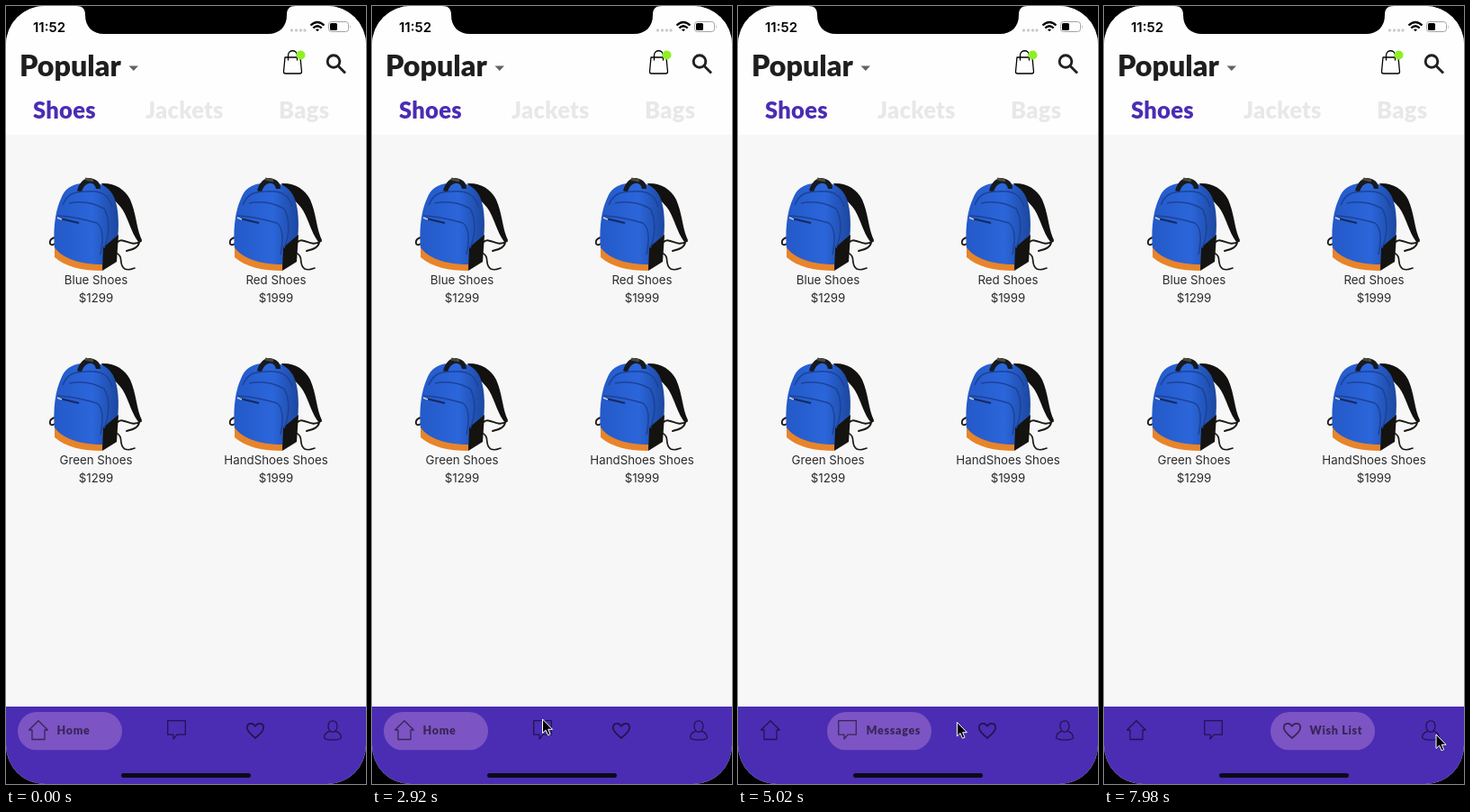
An HTML page that plays this animation: 400 by 864 pixels, repeating every 8000 ms.

```html
<!DOCTYPE html>
<html lang="en">
<head>
<meta charset="utf-8">
<title>Shop tab bar</title>
<style>
html, body { margin: 0; width: 100%; height: 100%; overflow: hidden; background: #000; }
svg { display: block; }
#stage { width: 100%; height: 100%; }
.head { font-family: Lato, sans-serif; font-weight: 900; }
.tab { font-size: 25.5px; letter-spacing: .3px; fill: #e8e8e8; }
.item { font: 13.3px Inter, sans-serif; text-anchor: middle; fill: #2b2b2b; }
.nav { font: 900 12.5px Lato, sans-serif; letter-spacing: .7px; }
.line { fill: none; stroke: #000; stroke-width: 1.3; stroke-linejoin: round; stroke-linecap: round; }
</style>
</head>
<body>
<svg id="stage" viewBox="0 0 400 864">
  <defs>
    <clipPath id="screen"><rect width="400" height="864" rx="43"/></clipPath>
    <linearGradient id="cloth">
      <stop offset="0" stop-color="#2459c8"/>
      <stop offset=".6" stop-color="#2b66da"/>
      <stop offset="1" stop-color="#1c479f"/>
    </linearGradient>
    <g id="pack">
      <path d="M58 7C72 6 84 13 90 25C97 41 97 58 103 70L100 73C92 64 89 49 82 37C77 29 70 23 64 20Z" fill="#121110"/>
      <g fill="none" stroke="#1b1914" stroke-linecap="round">
        <path d="M8 67C3 67 0 70 1 74C4 78 6 72 9 74" stroke-width="1.8"/>
        <path d="M76 72C84 66 90 79 102 71M100 71C100 78 94 80 86 82" stroke-width="2"/>
        <path d="M74 84C84 88 76 97 84 102C89 104 92 102 95 101" stroke-width="1.7"/>
      </g>
      <path d="M6 80C4 57 7 37 13 24C17 13 25 8 36 7C52 4 64 8 71 20C77 32 78 50 76 70L60 102L20 94Z" fill="url(#cloth)"/>
      <path d="M6 78C14 90 34 97 59 97L59 104C38 104 18 100 6 89Z" fill="#e8842a"/>
      <path d="M60 78L77 64L75 94L59 104Z" fill="#15130f"/>
      <path d="M31 15C34 5 39 1 45 1C52 2 57 5 57 13L52 13C51 8 48 6 44 7C40 8 37 12 36 17Z" fill="#171a20"/>
      <path d="M40 2L49 4" stroke="#4a4a3c" stroke-width="3"/>
      <g fill="none" stroke="#1b4299" stroke-width="1.5">
        <path d="M15 31C20 19 27 16 41 16C58 15 66 19 70 33"/>
        <path d="M22 29C37 26 50 29 61 35C68 47 67 65 61 79"/>
        <path d="M9 43C24 43 38 47 53 51C60 56 60 71 57 86"/>
      </g>
      <path d="M12 46L33 51" stroke="#15295c" stroke-width="2"/>
      <path d="M9 45L14 47" stroke="#c9d4e6" stroke-width="1.5"/>
    </g>
    <path id="home" d="M11 .7L.7 11H4V21.5H18V11H21.3Z"/>
    <path id="chat" d="M.7 .7H20.3V16.2H11L7 21V16.2H.7Z"/>
    <path id="heart" d="M12 20C7 16 2.8 12.5 2.8 8.6C2.8 3 9.3 2.2 12 6.8C14.7 2.2 21.2 3 21.2 8.6C21.2 12.5 17 16 12 20Z" stroke-width="1.8"/>
    <path id="user" d="M12 .8C8.6 .8 7 3.500 7 6.700C7 10.300 9 13.300 12 13.300C15 13.300 17 10.300 17 6.700C17 3.500 15.400 .8 12 .8ZM8.500 12.300C4.500 13.800 2.600 16 2.600 19.300C2.600 23 21.400 23 21.400 19.300C21.400 16 19.500 13.800 15.500 12.300"/>
  </defs>
  <rect width="400" height="864"/>
  <g clip-path="url(#screen)">
    <rect width="400" height="864" fill="#f7f7f7"/>
    <rect width="400" height="143" fill="#fefefe"/>
    <path d="M78 0C85 0 88 3 88 10C88 23 96 31 109 31H291C304 31 312 23 312 10C312 3 315 0 322 0Z"/>

    <text x="30" y="28.5" font-family="Inter, sans-serif" font-size="15" font-weight="600">11:52</text>
    <g fill="#cbcbcb">
      <circle cx="317.5" cy="27" r="1.7"/><circle cx="322.5" cy="27" r="1.7"/>
      <circle cx="327.5" cy="27" r="1.7"/><circle cx="332" cy="27" r="1.7"/>
    </g>
    <g fill="none" stroke="#000" stroke-width="2.3">
      <path d="M338.500 21.500Q346 14.500 353.500 21.500M341.300 24.500Q346 20 350.700 24.500"/>
      <path d="M344 26.300L346 28.300L348 26.300Q346 24.800 344 26.300Z" fill="#000" stroke="none"/>
    </g>
    <rect x="358.5" y="17.5" width="22" height="11" rx="3" fill="none" stroke="#a3a3a3"/>
    <path d="M382 21V25.500Q383.700 23.200 382 21Z" fill="#a3a3a3"/>
    <rect x="360" y="19" width="8" height="8" rx="1.5"/>

    <g class="head">
      <text x="15" y="78" font-size="32.2" fill="#1e1e1e">Popular</text>
      <text class="tab" x="30" y="125" style="fill:#4a2db3">Shoes</text>
      <text class="tab" x="155" y="125">Jackets</text>
      <text class="tab" x="303" y="125">Bags</text>
    </g>
    <path d="M136.500 66.500H147L141.800 72Z" fill="#636363"/>
    <path class="line" d="M310 57H327L328.500 73Q328.500 75 326.500 75H310.500Q308.500 75 308.500 73ZM313.500 60V55C313.500 48 323.500 48 323.500 55V60"/>
    <circle cx="327.5" cy="54.5" r="5" fill="#90ee25"/>
    <g fill="none" stroke="#202020" stroke-width="2.9">
      <circle cx="364" cy="61.5" r="6.8"/><path d="M369 66.500L377 74.500"/>
    </g>

    <g id="goods"></g>
    <rect y="778" width="400" height="86" fill="#4a2db3"/>
    <g id="bar"></g>
    <rect x="128" y="852" width="144" height="5" rx="2.5" fill="#0c0a18"/>
  </g>
  <path id="arrow" d="M0 0V15.500L3.600 12.200L6 17.800L8.600 16.700L6.200 11.300H11Z" stroke="#fff" stroke-width="1" stroke-linejoin="round"/>
</svg>
<script>
const LOOP = 8000, CLOSED = 48, OPEN = 116, GAP = 38, MARGIN = 13;
const $ = id => document.getElementById(id);

const goods = [['Blue', 1299], ['Red', 1999], ['Green', 1299], ['HandShoes', 1999]];
$('goods').innerHTML = goods.map(([name, price], i) =>
  `<g transform="translate(${i % 2 * 200} ${(i >> 1) * 200})">
    <use href="#pack" x="48" y="190"/>
    <text class="item" x="100" y="309.2">${name} Shoes</text>
    <text class="item" x="100" y="328.6">$${price}</text>
  </g>`).join('');

const tabs = [['home', 'Home'], ['chat', 'Messages'], ['heart', 'Wish List'], ['user', 'Profile']];
$('bar').innerHTML = tabs.map(([icon, label]) =>
  `<svg y="784" height="42.5">
    <rect width="100%" height="42.5" rx="21.2" fill="#7c54c4"/>
    <g opacity=".55">
      <use class="line" href="#${icon}" x="12" y="9"/>
      <text class="nav" x="43.5" y="25">${label}</text>
    </g>
  </svg>`).join('');
const items = [...$('bar').children].map(el => ({
  el, pill: el.querySelector('rect'), text: el.querySelector('text')
}));

const clamp = x => Math.min(1, Math.max(0, x));
const ease = x => x < .5 ? 2 * x * x : 1 - 2 * (1 - x) ** 2;
const ramp = (t, from, to) => ease(clamp((t - from) / (to - from)));

// Pointer moves: start, end, x, y
const moves = [
  [1200, 1560, 180, 763],
  [1560, 2100, 189.5, 792],
  [4600, 5300, 268.5, 797],
  [7150, 7750, 369, 809]
];

function draw(t) {
  const toChat = ramp(t, 3400, 3900), toWish = ramp(t, 6557, 7057);
  const open = [1 - toChat, toChat - toWish, toWish, 0];
  let x = MARGIN;
  items.forEach(({ el, pill, text }, i) => {
    const w = CLOSED + (OPEN - CLOSED) * open[i];
    el.setAttribute('x', x);
    el.setAttribute('width', w);
    pill.setAttribute('opacity', open[i]);
    // Labels only show in the wider part of the move
    text.setAttribute('opacity', clamp((open[i] - .3) / .4));
    x += w + GAP;
  });

  let px = 172, py = 735;
  for (const [from, to, mx, my] of moves) {
    const k = ramp(t, from, to);
    px += (mx - px) * k;
    py += (my - py) * k;
  }
  $('arrow').setAttribute('transform', `translate(${px} ${py})`);
  $('arrow').setAttribute('visibility', t < moves[0][0] ? 'hidden' : 'visible');
}

const start = performance.now();
function tick() {
  draw((performance.now() - start) % LOOP);
  requestAnimationFrame(tick);
}
draw(0);
requestAnimationFrame(tick);
</script>
</body>
</html>
```
